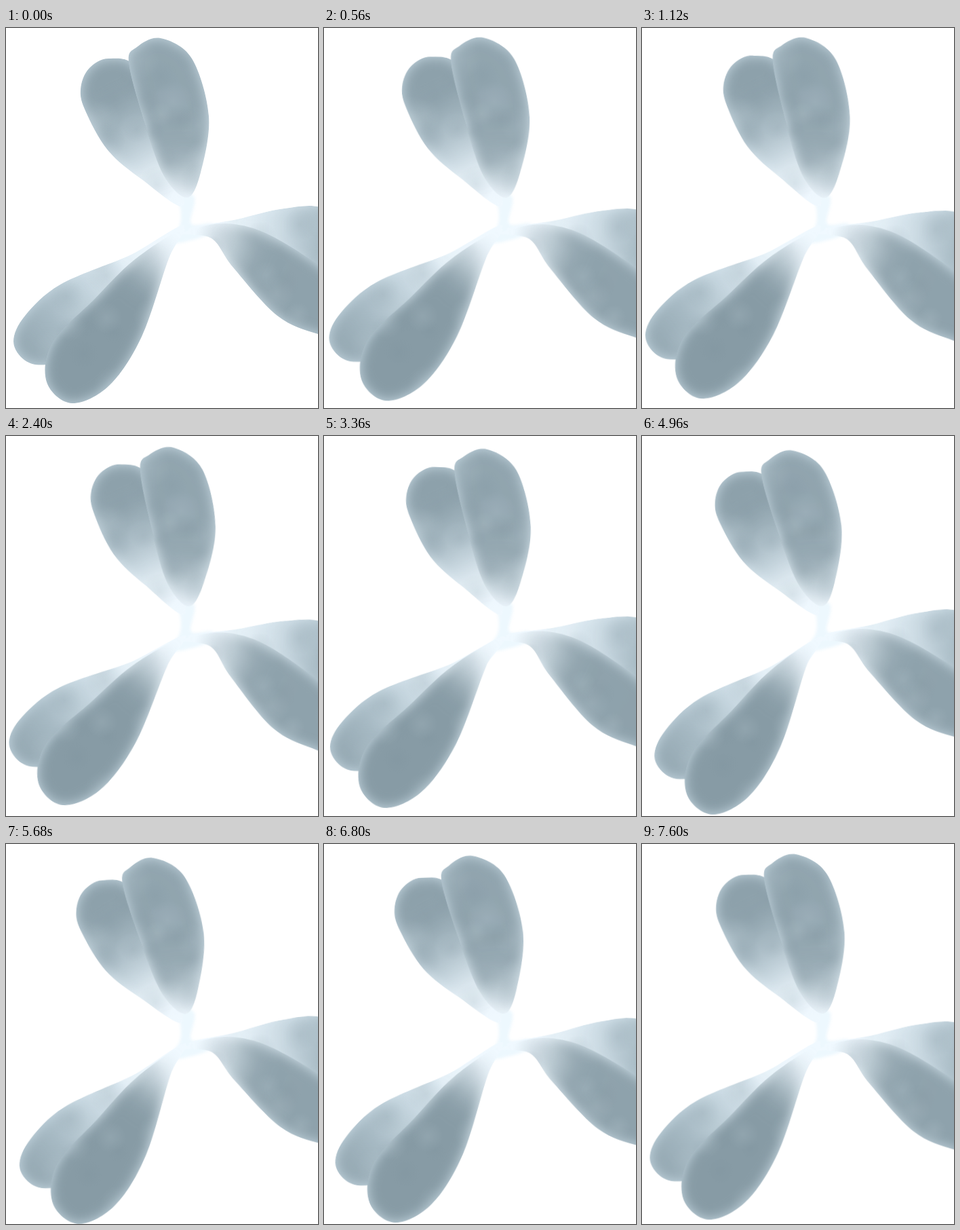
These frames come from a looping animation (460 px wide and 560 px high, 7.68 s). An HTML page:

```html
<!DOCTYPE html>
<html lang="en">
<head>
<meta charset="utf-8">
<title>Drifting petals</title>
<style>
  html, body { margin: 0; width: 100%; height: 100%; overflow: hidden; background: #fff; }
  svg { display: block; width: 460px; height: 560px; }
</style>
</head>
<body>
<svg id="stage" viewBox="0 0 460 560" xmlns="http://www.w3.org/2000/svg"></svg>
<script>
const LOOP = 7680, STEP = 80, REACH = 320;
const HUB = { x: 262, y: 293 };
const PALE = [240, 249, 255], RIM = [199, 217, 227], BODY = '#879ba5';

// sway: degrees; shrink and drift follow the slower tilt; fade: distances from the hub.
const petals = [
  { outline: '152,45 195,62 235,170 262,262 200,223 150,180 117,122 110,90 122,60',
    fade: [60, 240], depth: .9, sway: 3.2, shrink: .011, drift: [0, 0] },
  { outline: '228,15 274,45 299,130 287,213 267,250 233,218 205,142 181,52 193,28',
    fade: [20, 130], depth: .85, sway: 3.2, shrink: .011, drift: [0, 0] },
  { outline: '262,297 110,480 60,496 28,490 11,462 28,424 80,378 180,336',
    fade: [90, 360], depth: .9, sway: 2.7, shrink: 0, drift: [2, 2.6] },
  { outline: '262,296 190,341 128,402 68,464 60,522 97,553 152,527 200,455 240,340',
    fade: [20, 130], depth: 1, sway: 2.8, shrink: 0, drift: [.3, .6] },
  { outline: '270,298 340,282 410,266 470,266 530,310 510,380 400,320',
    fade: [80, 310], depth: .9, sway: 2.7, shrink: 0, drift: [0, -1.4] },
  { outline: '258,303 325,288 400,311 500,385 520,462 460,451 400,424 335,353 303,310',
    fade: [20, 130], depth: .9, sway: 2.7, shrink: 0, drift: [0, -1.4] }
];
const stem = '238,236 277,248 273,288 303,288 300,304 245,317 257,288 255,258';

const smoothstep = (a, b, x) => {
  const t = Math.min(1, Math.max(0, (x - a) / (b - a)));
  return t * t * (3 - 2 * t);
};
const mix = (a, b, t) => `rgb(${a.map((v, i) => Math.round(v + (b[i] - v) * t))})`;
const parse = text => text.split(' ').map(p => p.split(',').map(Number));

let seed = 11;
const random = () => (seed = seed * 16807 % 2147483647) / 2147483647;

// Closed smooth curve through the given points.
function smoothPath(pts) {
  const at = i => pts[(i + pts.length) % pts.length];
  const handle = (i, dir) => [0, 1].map(k => at(i)[k] + dir * (at(i + 1)[k] - at(i - 1)[k]) / 6);
  return 'M' + pts[0] + pts.map((_, i) =>
    `C${handle(i, 1)} ${handle(i + 1, -1)} ${at(i + 1)}`).join('') + 'Z';
}

// Gradient around the hub; style(r) gives the look at distance r.
function hubGradient(id, style) {
  let stops = '';
  for (let r = 0; r <= REACH; r += 20) stops += `<stop offset="${r / REACH}" style="${style(r)}"/>`;
  return `<radialGradient id="${id}" gradientUnits="userSpaceOnUse" cx="${HUB.x}" cy="${HUB.y}" r="${REACH}">${stops}</radialGradient>`;
}

const cloudFill = (id, color) =>
  `<radialGradient id="${id}"><stop stop-color="${color}"/><stop offset="1" stop-color="${color}" stop-opacity="0"/></radialGradient>`;

const blur = (id, amount) =>
  `<filter id="${id}" filterUnits="userSpaceOnUse" x="-60" y="-60" width="660" height="700" color-interpolation-filters="sRGB"><feGaussianBlur stdDeviation="${amount}"/></filter>`;

const defs = [
  hubGradient('rim', r => `stop-color:${mix(PALE, RIM, smoothstep(20, 250, r))}`),
  cloudFill('dark', '#788d98'), cloudFill('light', '#c4d4dc'),
  blur('soft', 9), blur('haze', 2.2), blur('edge', .7)
];

function clouds(pts) {
  const along = k => {
    const values = pts.map(p => p[k]), low = Math.min(...values);
    return low + (Math.max(...values) - low) * (.1 + .8 * random());
  };
  return Array.from({ length: 16 }, (_, i) =>
    `<circle cx="${along(0)}" cy="${along(1)}" r="${16 + 16 * random()}" fill="url(#${i % 2 ? 'dark' : 'light'})" opacity=".16"/>`).join('');
}

function petalMarkup({ outline, fade, depth }, i) {
  const pts = parse(outline), d = smoothPath(pts);
  defs.push(
    `<clipPath id="clip${i}"><path d="${d}"/></clipPath>`,
    hubGradient(`body${i}`, r => `stop-color:${BODY};stop-opacity:${depth * smoothstep(...fade, r)}`));
  return `<g class="petal" filter="url(#edge)"><g clip-path="url(#clip${i})">
    <path d="${d}" fill="url(#rim)"/>
    <path d="${d}" fill="url(#body${i})" filter="url(#soft)"/>
    ${clouds(pts)}</g></g>`;
}

const body = petals.map(petalMarkup).join('');
const stage = document.getElementById('stage');
stage.innerHTML = `<defs>${defs.join('')}</defs>
  <path d="${smoothPath(parse(stem))}" fill="#edf8fe" filter="url(#haze)"/>${body}`;
const nodes = stage.querySelectorAll('.petal');

function pose(time) {
  const phase = 2 * Math.PI * (time - 230) / LOOP;
  return { swing: Math.sin(phase), tilt: -Math.cos(phase) };
}
const rest = pose(0);

function draw(time) {
  const now = pose(time);
  const swing = now.swing - rest.swing, tilt = now.tilt - rest.tilt;
  petals.forEach(({ sway, shrink, drift }, i) => {
    const x = HUB.x + drift[0] * tilt, y = HUB.y + drift[1] * tilt;
    nodes[i].setAttribute('transform',
      `translate(${x} ${y}) rotate(${sway * swing}) scale(${1 - shrink * tilt}) translate(${-HUB.x} ${-HUB.y})`);
  });
}

const start = performance.now();
function tick() {
  draw(Math.floor((performance.now() - start) % LOOP / STEP) * STEP);
  requestAnimationFrame(tick);
}
tick();
</script>
</body>
</html>
```
